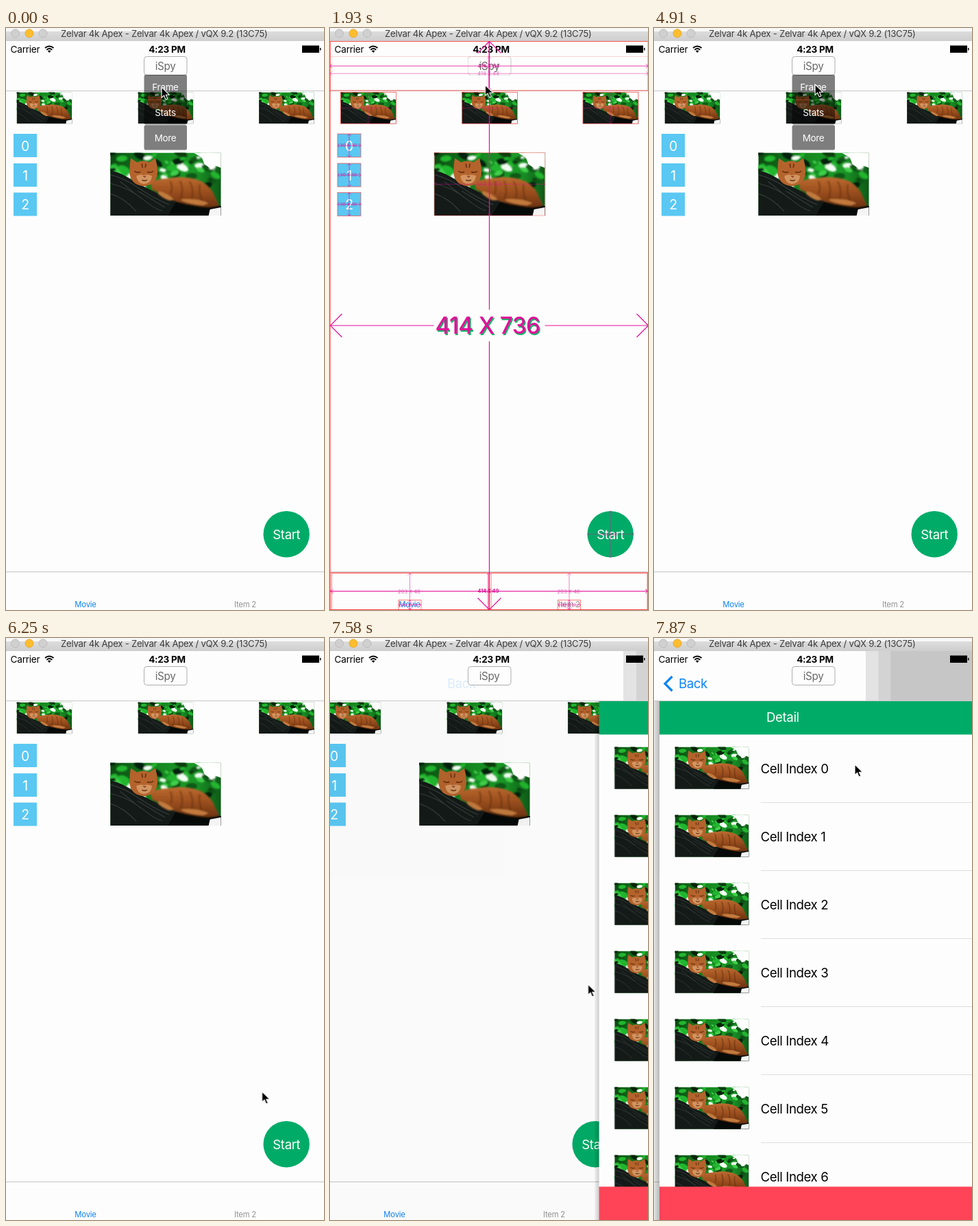
Animation of 464x847 px, one loop 8000 ms. Source, as an HTML page:

```html
<!DOCTYPE html>
<html lang="en">
<head>
<meta charset="utf-8">
<title>View inspector demo</title>
<style>
html, body { margin: 0; width: 100%; height: 100%; overflow: hidden; background: #fdfdfd; }
svg { display: block; width: 100%; height: 100%; }
text { font-family: Inter, Roboto, sans-serif; letter-spacing: -.02em; font-size: 18.6px; }
.mid { text-anchor: middle; }
.small { font-size: 13.4px; }
.tab { font-size: 11.3px; }

#cursor, #overlay, #menu, #frameItem, #screen, #dim, #detail, #back, #chevron, #navEdge {
  animation: 8s step-end infinite;
}
#cursor { animation-name: cursor; }
#overlay { animation-name: overlay; }
#menu { animation-name: menu; }
#frameItem { animation-name: frameItem; }
#screen { animation-name: screen; }
#dim { animation-name: dim; }
#detail { animation-name: detail; }
#back { animation-name: back; }
#chevron { animation-name: chevron; }
#navEdge { animation-name: navEdge; }

@keyframes cursor {
  0% { transform: translate(227px, 86px); }
  24.125% { transform: translate(226.5px, 83px); }
  26% { transform: translate(226.5px, 75px); }
  27.75% { transform: translate(228px, 61px); }
  29.625% { transform: translate(230px, 54px); }
  44.625% { transform: translate(230.5px, 57px); }
  46.375% { transform: translate(232px, 66px); }
  48.25% { transform: translate(234px, 77px); }
  50.125% { transform: translate(235px, 82px); }
  67% { transform: translate(241px, 85px); }
  68.875% { transform: translate(250px, 87px); }
  72.5% { transform: translate(262px, 112px); }
  74.375% { transform: translate(315px, 320px); }
  76.25% { transform: translate(365px, 590px); }
  78.125% { transform: translate(373.5px, 660px); }
  79.875% { transform: translate(379px, 661px); }
  81.75% { transform: translate(375.5px, 659px); }
  85.5% { transform: translate(379px, 672px); }
  87.375% { transform: translate(385px, 705px); }
  89.25% { transform: translate(391px, 726px); }
  94.75% { transform: translate(376.5px, 504px); }
  96.5% { transform: translate(335px, 335px); }
  98.375% { transform: translate(293px, 184px); }
}
@keyframes overlay { 0%, 61.375% { opacity: 0; } 13% { opacity: 1; } }
@keyframes menu { 0%, 40.875% { opacity: 1; } 14.875%, 63.25% { opacity: 0; } }
@keyframes frameItem { 0%, 59.5% { fill: #fff; } 7.5% { fill: #00b060; } }
@keyframes screen {
  0% { transform: none; }
  94.75% { transform: translate(-22px); }
  96.5% { transform: translate(-107px); }
  98.375% { transform: translate(-137px); }
}
@keyframes dim { 0% { opacity: 0; } 94.75% { opacity: .015; } 96.5% { opacity: .075; } 98.375% { opacity: .1; } }
@keyframes detail {
  0% { transform: translate(480px); }
  94.75% { transform: translate(392.6px); }
  96.5% { transform: translate(105px); }
  98.375% { transform: translate(8px); }
}
@keyframes back {
  0% { transform: translate(196px); opacity: 0; }
  94.75% { transform: translate(171px); opacity: .14; }
  96.5% { transform: translate(70px); opacity: .75; }
  98.375% { transform: translate(36px); opacity: 1; }
}
@keyframes chevron { 0% { opacity: 0; } 96.5% { opacity: .7; } 98.375% { opacity: 1; } }
@keyframes navEdge {
  0% { transform: translate(470px); }
  94.75% { transform: translate(428px); }
  96.5% { transform: translate(345px); }
  98.375% { transform: translate(308.5px); }
}
</style>
</head>
<body>
<svg viewBox="0 0 464 847" preserveAspectRatio="none">
  <defs>
    <linearGradient id="bar" x2="0" y2="1">
      <stop stop-color="#dcdcdc"/><stop offset="1" stop-color="#cecece"/>
    </linearGradient>
    <linearGradient id="shade">
      <stop stop-opacity=".03"/><stop offset="1" stop-opacity=".18"/>
    </linearGradient>
    <linearGradient id="fur" x2="0" y2="1">
      <stop stop-color="#bb6a30"/><stop offset=".5" stop-color="#9a4e1d"/><stop offset="1" stop-color="#6b3210"/>
    </linearGradient>
    <linearGradient id="foliage">
      <stop stop-color="#0c4a12"/><stop offset=".4" stop-color="#15861f"/><stop offset=".75" stop-color="#1b9a27"/><stop offset="1" stop-color="#0f5a18"/>
    </linearGradient>
    <filter id="soft"><feGaussianBlur stdDeviation="1"/></filter>
    <clipPath id="listClip"><path d="M0 141h464v658H0z"/></clipPath>
    <symbol id="photo" viewBox="0 0 162 92">
      <path fill="url(#foliage)" d="M0 0h162v92H0z"/>
      <g id="leaves" filter="url(#soft)"></g>
      <path fill="#fff" d="M122 0h40v22l-8-3-6 5-10-7-4-10z"/>
      <path fill="#141a18" d="M0 26q18 4 34 16l40 20 44 14 44 2v14H0z"/>
      <path fill="none" stroke="#4a524e" stroke-opacity=".6" stroke-width="1.2" d="M0 32q22 6 42 20t44 24M0 45q26 6 46 22t30 18M0 60q20 6 38 26M14 42l30 24M40 56l40 24"/>
      <path fill="#060a08" d="M96 72l66 6v14H84z"/>
      <path fill="#f4f4f4" d="M146 83l16-3v12h-18z"/>
      <g filter="url(#soft)">
        <path fill="url(#fur)" d="M58 42q16-4 30-5 24-4 46 5 15 9 20 24 5 9 5 12-14 4-34 0-34-5-50-18l-14-6z"/>
        <path fill="none" stroke="#5f2a0b" stroke-opacity=".5" stroke-width="2.5" d="M88 42q4 11 0 18M102 41q6 12 1 26M116 42q7 12 3 27M131 46q-2 13 4 26"/>
        <path fill="#c27a3e" d="M70 56q15 3 23 13l-7 1q-10-4-16-10zM104 68q23-2 40 6l-8 3q-19-1-32-7z"/>
      </g>
      <path fill="#b4632c" d="M30 8l9 6q9-4 18 0l9-6q3 10 3 20 0 18-19 21-20-1-22-19 0-14 2-22z"/>
      <path fill="#d39560" d="M38 34q6-3 11-1 6-2 12 1-1 11-12 12-10-1-11-12z"/>
      <path fill="none" stroke="#4d2008" stroke-opacity=".75" stroke-width="1.7" d="M35 27q5 3 9 1M54 28q5 2 9-1M46 16l1 6M52 16l-1 6M46 40l4 1 4-1"/>
      <path fill="#914936" d="M47 34h6l-3 3z"/>
    </symbol>
  </defs>

  <path fill="#fdfdfd" d="M0 0h464v847H0z"/>

  <g id="screen">
    <path fill="#fdfdfd" d="M0 91h464v756H0z"/>
    <g id="thumbs"></g>
    <use href="#photo" x="152" y="181.5" width="162" height="91.5"/>
    <g id="tiles" fill="#5ac8f2"></g>
    <circle cx="409.2" cy="736.7" r="33.7" fill="#00ab68"/>
    <text class="mid" x="409.3" y="743.5" fill="#fff">Start</text>
    <path fill="#fdfdfd" d="M0 791h602v56H0z"/>
    <path stroke="#c4c4c4" d="M0 791.5h602"/>
    <text class="mid tab" x="116" y="843" fill="#0c83f2">Movie</text>
    <text class="mid tab" x="349" y="843" fill="#929292">Item 2</text>
  </g>
  <path id="dim" d="M0 91h464v756H0z"/>

  <g id="detail">
    <path fill="url(#shade)" d="M-7 91h7v756h-7z"/>
    <path fill="#fdfdfd" d="M0 91h480v756H0z"/>
    <path fill="#00ab68" d="M0 91h480v49.5H0z"/>
    <text x="156" y="122" fill="#fff">Detail</text>
    <g id="cells" clip-path="url(#listClip)"></g>
    <path fill="#ff4458" d="M0 798.5h480V847H0z"/>
  </g>

  <path fill="#fdfdfd" d="M0 19h464v72H0z"/>
  <path stroke="#c8c8c8" d="M0 91.5h464"/>
  <g id="navEdge">
    <path fill="#e3e3e3" d="M0 19h180v72H0z"/>
    <path fill="#d3d3d3" d="M19 19h160v72H19z"/>
    <path fill="#c6c6c6" d="M37 19h143v72H37z"/>
  </g>
  <g fill="#0b84f5">
    <path id="chevron" fill="none" stroke="#0b84f5" stroke-width="3.2" d="M26.5 56L16 66.5 26.5 77"/>
    <text id="back" y="73">Back</text>
  </g>

  <path fill="#f7f7f7" d="M0 0h464v5H0z"/>
  <path fill="url(#bar)" d="M0 5h464v14H0z"/>
  <g fill="#d0d0d0" stroke="#b5b5b5" stroke-width=".8">
    <circle cx="13.5" cy="7.8" r="6"/>
    <circle cx="34" cy="7.8" r="6" fill="#fdbd2f" stroke="#e0a32a"/>
    <circle cx="54" cy="7.8" r="6"/>
  </g>
  <text x="80" y="13" fill="#3c3c3c" style="font-size:13.2px">Zelvar 4k Apex - Zelvar 4k Apex / vQX 9.2 (13C75)</text>

  <text x="6.5" y="35.5" style="font-size:13.7px">Carrier</text>
  <g fill="none" stroke="#000" stroke-width="1.9">
    <path d="M57 29q6-5 12.5 0M59.3 31.7q4-3.3 8 0"/>
    <path fill="#000" stroke="none" d="M60.8 33.3q2.4-1.800 4.800 0l-2.400 2.600z"/>
  </g>
  <text class="mid" x="235" y="35.5" font-weight="700" style="font-size:13.5px">4:23 PM</text>
  <path d="M432 25.500h25v10.500h-25zM458 29h1.500v3.500H458z"/>

  <rect x="201.5" y="41.5" width="62.500" height="27" rx="4" fill="#fdfdfd" stroke="#a4a4a4" stroke-width=".9"/>
  <text class="mid" x="232.500" y="60.500" fill="#686868" style="font-size:15.200px">iSpy</text>

  <g id="overlay" fill="none" stroke="#e5109a"></g>

  <g id="menu" fill="#fff">
    <g fill="#000" fill-opacity=".5">
      <rect x="201.5" y="68" width="62.500" height="36" rx="2.500"/>
      <rect x="201.5" y="104.600" width="62.500" height="36" rx="2.500"/>
      <rect x="201.5" y="141.200" width="62.500" height="36.300" rx="2.500"/>
    </g>
    <text id="frameItem" class="mid small" x="232.500" y="91">Frame</text>
    <text class="mid small" x="232.500" y="128">Stats</text>
    <text class="mid small" x="232.500" y="164.500">More</text>
  </g>

  <path id="cursor" fill="#000" stroke="#fff" stroke-width="1.100" d="M0 0v15.500l3.600-3.300 2.500 5.900 2.700-1.200-2.500-5.700h4.900z"/>
</svg>
<script>
const $ = id => document.getElementById(id);
const times = (n, make) => Array.from({ length: n }, (_, i) => make(i)).join('');
const image = (x, y, w, h) => `<use href="#photo" x="${x}" y="${y}" width="${w}" height="${h}"/>`;

let seed = 11;
const random = () => (seed = seed * 16807 % 2147483647) / 2147483647;
const greens = ['#062408', '#0a3d10', '#0e5a17', '#22b52f', '#3fd04a', '#f2fff2'];
$('leaves').innerHTML = times(90, () => {
  const x = random() * 162, y = random() * 60, r = 2 + random() * 6;
  const color = greens[Math.floor(random() * greens.length)];
  return `<ellipse cx="${x}" cy="${y}" rx="${r * 1.3}" ry="${r * .7}" fill="${color}" transform="rotate(${random() * 90 - 45} ${x} ${y})"/>`;
});

const thumbX = [15.5, 192.5, 369], tileY = [154, 197, 239.5];
$('thumbs').innerHTML = thumbX.map(x => image(x, 93.5, 81, 45.7)).join('');
$('tiles').innerHTML = tileY.map((y, i) =>
  `<rect x="11" y="${y}" width="34" height="34"/><text class="mid" x="28" y="${y + 24.5}" fill="#fff" style="font-size:19.5px">${i}</text>`).join('');
$('cells').innerHTML = times(8, i => {
  const y = 141 + i * 99;
  return image(22.5, y + 17.5, 108, 61.3) +
    `<text x="147.5" y="${y + 56}">Cell Index ${i}</text><path stroke="#dedede" d="M148 ${y + 98.5}h332"/>`;
});

// Outline with a double arrow on each axis and a size label in the middle.
function measure(x, y, w, h, label, { size = 6.5, head = 3, gapX = 0, gapY = 0, alpha = 1, weight = 400, frame = .8 } = {}) {
  const cx = x + w / 2, cy = y + h / 2, r = x + w, b = y + h;
  return `<rect x="${x}" y="${y}" width="${w}" height="${h}" stroke="#ff3b3b" stroke-width=".8" opacity="${frame}"/>
    <g opacity="${alpha}"><path stroke-width="${head > 9 ? 1.2 : .8}" d="M${x} ${cy}H${cx - gapX}M${cx + gapX} ${cy}H${r}
      M${cx} ${y}V${cy - gapY}M${cx} ${cy + gapY}V${b}
      M${x + head} ${cy - head}l${-head} ${head} ${head} ${head}M${r - head} ${cy - head}l${head} ${head} ${-head} ${head}
      M${cx - head} ${y + head}l${head} ${-head} ${head} ${head}M${cx - head} ${b - head}l${head} ${head} ${head} ${-head}"/>
    <text class="mid" x="${cx - 1}" y="${cy + size * .36}" fill="#d8108f" stroke="none" font-weight="${weight}" style="font-size:${size}px;letter-spacing:0">${label}</text></g>`;
}

const bigLabel = (x, y, fill) =>
  `<text class="mid" x="${x}" y="${y}" fill="${fill}" stroke="none" font-weight="500" style="font-size:33.5px">414 X 736</text>`;

$('overlay').innerHTML =
  '<rect x="201.5" y="41.5" width="62.5" height="27" rx="4" stroke="#fdfdfd" stroke-opacity=".7"/>' +
  measure(.5, 19.5, 464, 827, '', { head: 17, gapX: 81, gapY: 23 }) +
  bigLabel(231.5, 446.5, '#14b866') + bigLabel(230, 445, '#e0109a') +
  measure(0, 19.5, 464, 71.5, '414 X 64', { size: 7.5 }) +
  measure(0, 41.5, 464, 49.5, '414 X 44', { size: 7.5, alpha: .6, frame: .25 }) +
  thumbX.map(x => measure(x, 93.5, 81, 45.7, '72 X 40', { alpha: .35 })).join('') +
  tileY.map(y => measure(11, y, 34, 34, '30 X 30', { alpha: .85 })).join('') +
  measure(152, 181.5, 162, 91.5, '144 X 82', { size: 9, alpha: .55, frame: .5 }) +
  measure(375.3, 702.7, 68, 68, '60 X 60', { alpha: .5, frame: 0 }) +
  measure(.5, 792.5, 463, 54, '414 X 49', { size: 7.2, weight: 700 }) +
  [[2.5, 100], [235, 332.5]].map(([x, labelX]) =>
    measure(x, 793.5, 228, 53, '203 X 48', { size: 7.5, alpha: .65 }) +
    measure(labelX, 832.5, 33, 14, '30 X 12', { alpha: .7 })).join('');
</script>
</body>
</html>
```
